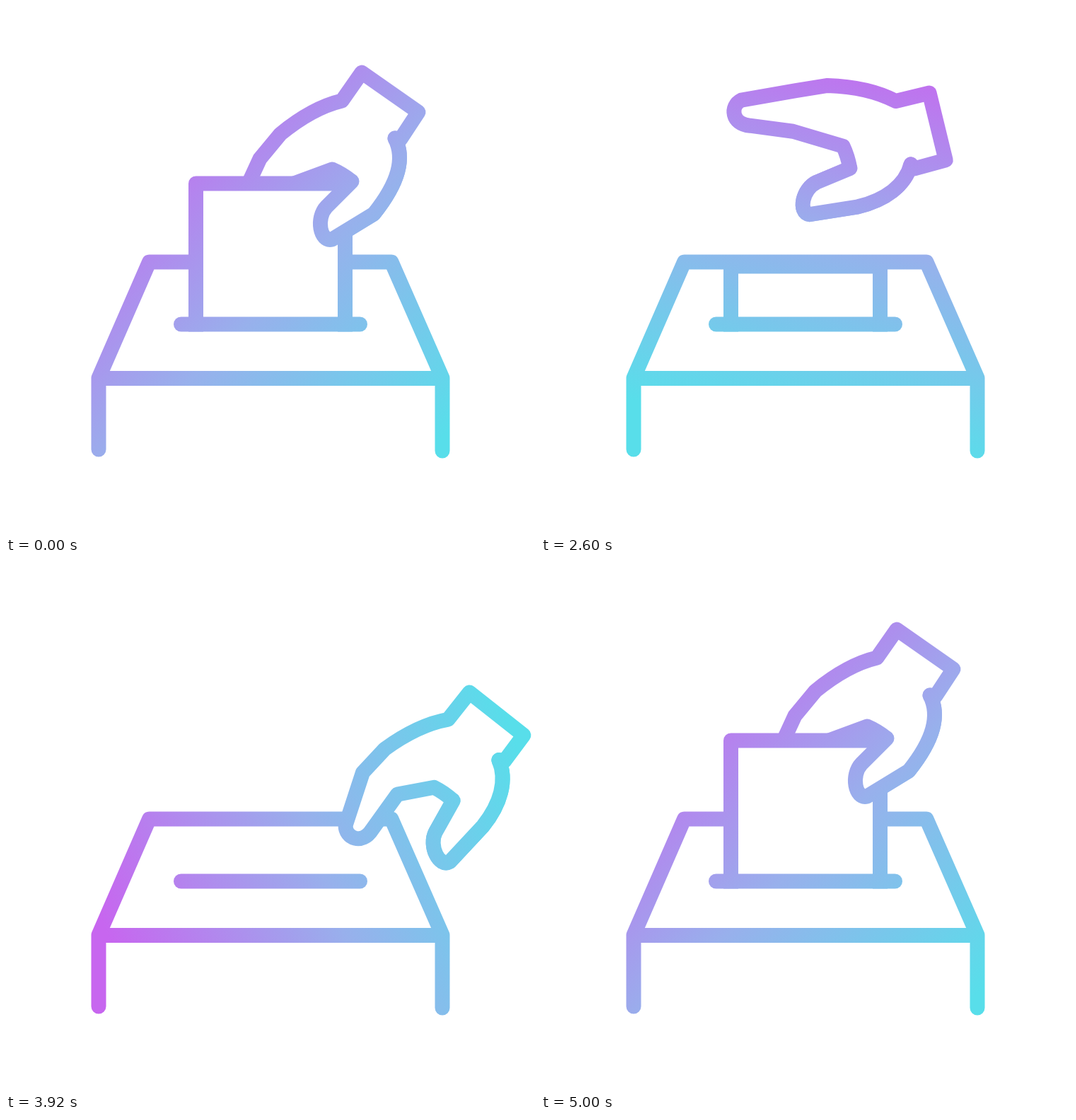
Animation of 748x748 px, one loop 5.02 s. Source, as an HTML page with a canvas:

```html
<!DOCTYPE html>
<html lang="en">
<head>
<meta charset="utf-8">
<title>Casting a ballot</title>
<style>
  html, body { margin: 0; width: 100%; height: 100%; overflow: hidden; background: #fff; }
  canvas { display: block; }
</style>
</head>
<body>
<canvas id="stage" width="748" height="748"></canvas>
<script>
const ctx = document.getElementById('stage').getContext('2d');
const SIZE = 748, LOOP = 5020, RAD = Math.PI / 180;
const START = 1993, RELEASE = 2350, PRESS = 2900, GONE = 3635, RETURN = 4170, END = 5000;
const REST = 368, SLOT_EDGE = 460.5;

// Degrees by which the finger and the thumb are bent.
const PINCH = [14, 0], POINT = [0, 19], RELAX = [24, 19];

// Key poses: time, wrist x, wrist y, turn, grip.
const CAST = [
  [START, 550, 187, 0, ...PINCH],
  [RELEASE, 550, 304, 0, ...PINCH],
  [2600, 523, 224, 41.3, ...POINT],
  [PRESS, 550, 202, 16, ...RELAX],
  [3170, 572, 260, -7, ...RELAX],
  [GONE, 535, 388, -7, ...RELAX],
  [3920, 696, 279, 3.3, ...RELAX],
  [4130, 990, 170, 14, ...RELAX]
];
const FETCH = [
  [RETURN, 900, -250, 50, ...PINCH],
  [4420, 661, 36, 38, ...PINCH],
  [END, 550, 187, 0, ...PINCH]
];

// Smooth interpolation through the key poses without overshoot.
function sample(keys, t) {
  const last = keys.length - 1;
  t = Math.min(Math.max(t, keys[0][0]), keys[last][0]);
  const i = Math.max(0, keys.findIndex(k => k[0] >= t) - 1);
  const span = keys[i + 1][0] - keys[i][0], u = (t - keys[i][0]) / span, v = 1 - u;
  return keys[i].slice(1).map((a, n) => {
    const c = n + 1, b = keys[i + 1][c];
    const slope = k => (keys[k + 1][c] - keys[k][c]) / (keys[k + 1][0] - keys[k][0]);
    const tangent = k => {
      if (k === 0 || k === last) return 0;
      const p = slope(k - 1), q = slope(k);
      return p * q > 0 ? 2 * p * q / (p + q) : 0;
    };
    return a * (1 + 2 * u) * v * v + b * u * u * (3 - 2 * u)
      + span * u * v * (tangent(i) * v - tangent(i + 1) * u);
  });
}

// Joint-relative points, bent around the joint, as path text.
function bent([jx, jy], degrees, points) {
  const c = Math.cos(degrees * RAD), s = Math.sin(degrees * RAD);
  return points.map(([x, y]) => `${jx + x * c + y * s} ${jy - x * s + y * c} `);
}

function place(d, x, y, turn) {
  const path = new Path2D();
  path.addPath(new Path2D(d), new DOMMatrix().translate(x, y).rotate(turn));
  return path;
}

function paint(path) {
  ctx.fill(path);
  ctx.stroke(path);
}

function clipped(on, path) {
  ctx.save();
  if (on) {
    ctx.beginPath();
    ctx.rect(0, 0, SIZE, SLOT_EDGE);
    ctx.clip();
  }
  paint(path);
  ctx.restore();
}

// Coordinates are relative to the wrist.
function handPaths(fingerBend, thumbBend) {
  const f = bent([-191, 29], fingerBend, [[-49, 61], [-56, 78], [-37, 96], [-16, 80], [35, 46]]);
  const h = bent([-61, 61], thumbBend, [[31, 46], [-28, 82], [-45, 86], [-51, 52], [-36, 36]]);
  const thumb = `C14 28 6 62 ${h[0]}L${h[1]}C${h[2]}${h[3]}${h[4]}L-61 61`;
  const finger = `L${f[4]}L${f[3]}C${f[2]}${f[1]}${f[0]}L-191 29`;
  return {
    thumb: 'M0 0' + thumb,
    whole: `M-75 -53L-47 -93L33 -37L8 1L0 0${thumb}Q-75 50 -89 44${finger}L-162 -6Q-117 -43 -75 -53Z`
  };
}

// The free end of the paper lags behind as the hand turns.
function ballotPath(lag) {
  const left = -281.5, right = -70.5, top = 64, mid = 176, low = 289;
  return `M${left - 40 * lag} ${low - 14 * lag}`
    + `Q${left + 11 * lag} ${mid + 25 * lag} ${left} ${top}L${right} ${top}`
    + `Q${right} ${mid + 75 * lag} ${right - 64 * lag} ${low + 82 * lag}Z`;
}

// Height at which the paper stands in the slot, relative to the hand's pinch.
function ballotY(t, y) {
  if (t < RELEASE) return y;
  if (t < PRESS) return REST - 64;
  return t < GONE ? Math.max(REST - 64, y + 53) : SIZE;
}

// The gradient makes one eased turn while the hand is moving.
function shade(t) {
  const u = Math.min(Math.max((t - START) / (END - START), 0), 1);
  const v = 1 - (1 - u) ** 1.28;
  const a = (45 + 360 * v * v * (3 - 2 * v)) * RAD;
  const dx = Math.cos(a), dy = Math.sin(a), shift = 91 * dx - 36, half = 290 + 30 * dx;
  const at = s => [SIZE / 2 + dx * s, SIZE / 2 + dy * s];
  const g = ctx.createLinearGradient(...at(shift - half), ...at(shift + half));
  ['#c766ef', '#98b0ec', '#58deea'].forEach((color, i) => g.addColorStop(i / 2, color));
  return g;
}

const box = new Path2D('M131 627V526L202.5 362H545L617 526V629M131 526.5H617');
const slot = new Path2D('M247.5 450H500.5');

function render(t) {
  ctx.fillStyle = '#fff';
  ctx.fillRect(0, 0, SIZE, SIZE);
  ctx.strokeStyle = shade(t);
  ctx.lineWidth = 21;
  ctx.lineCap = ctx.lineJoin = 'round';

  const fetching = t >= RETURN;
  const [x, y, turn, fingerBend, thumbBend] = sample(fetching ? FETCH : CAST, t);
  const hand = handPaths(fingerBend, thumbBend);
  const ballot = fetching
    ? place(ballotPath(turn / 38), x, y, turn)
    : place(ballotPath(0), 550, ballotY(t, y), 0);
  const pressing = t > PRESS && t < GONE;

  ctx.stroke(box);
  clipped(pressing, place(hand.whole, x, y, turn));
  clipped(true, ballot);
  ctx.stroke(slot);
  clipped(pressing, place(hand.thumb, x, y, turn));
}

const start = performance.now();
function tick() {
  render((performance.now() - start) % LOOP);
  requestAnimationFrame(tick);
}
tick();
</script>
</body>
</html>
```
